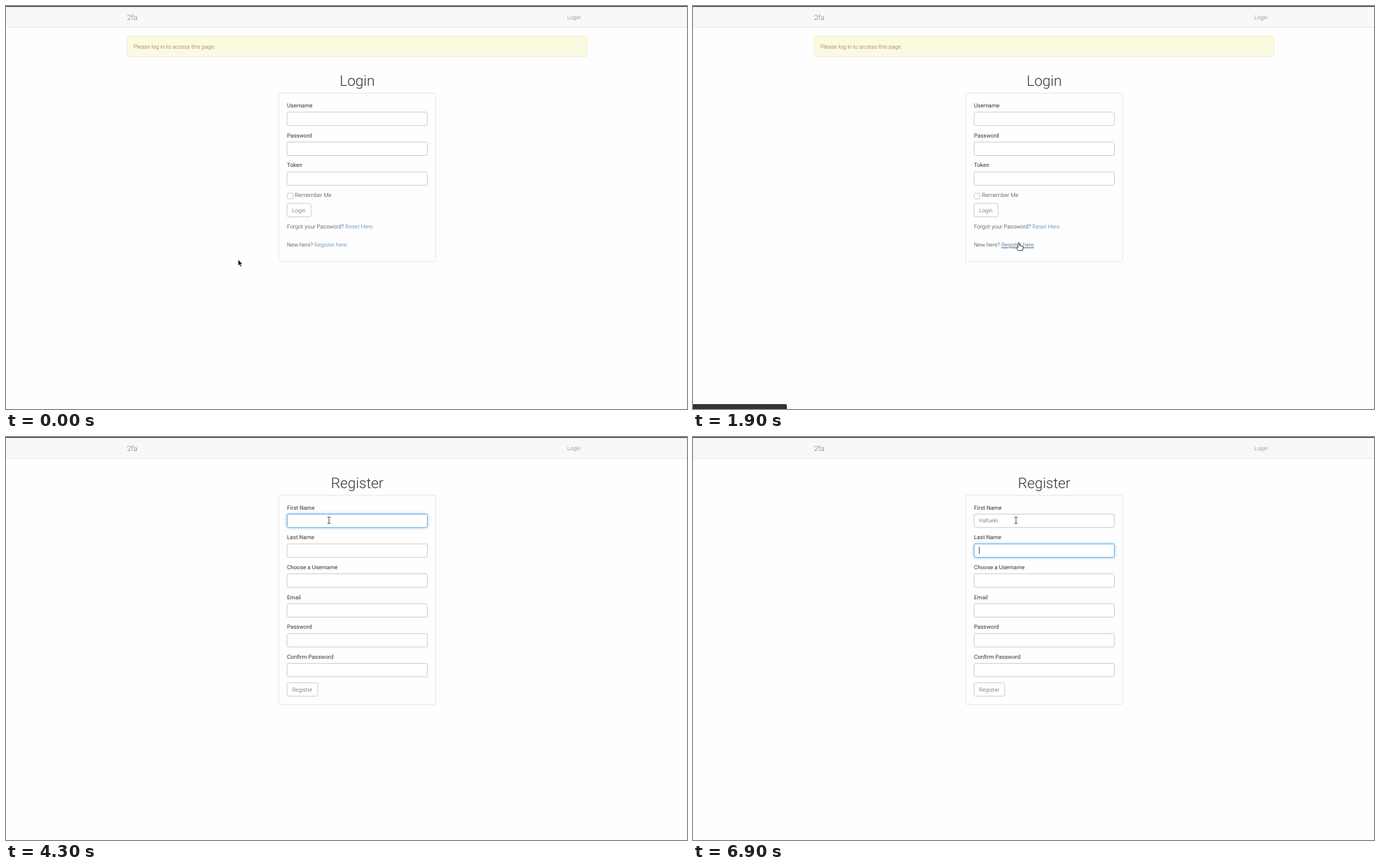
Recreate the animation shown at these times as an HTML page. Size 972 by 576 pixels, loop 8 s.

```html
<!DOCTYPE html>
<html lang="en">
<head>
<meta charset="utf-8">
<title>Sign-up form</title>
<style>
html, body { margin: 0; width: 100%; height: 100%; overflow: hidden; background: #fefefe; }
svg { display: block; }
text { font: 300 8.07px Roboto, sans-serif; fill: #333; text-rendering: geometricPrecision; white-space: pre; }
.label { font-weight: 400; }
.title { font-size: 20.76px; text-anchor: middle; }
.brand { font-size: 10.38px; }
.nav { fill: #777; }
.note { fill: #8a6d3b; }
.value { fill: #555; }
.link { fill: #337ab7; }
.hover { fill: #23527c; text-decoration: underline; }
.panel { fill: #fefefe; stroke: #e6e6e6; }
.field { fill: #fff; stroke: #c8c8c8; stroke-width: .9; }
.glow { fill: #fff; stroke: #66afe9; filter: drop-shadow(0 0 2px rgba(102, 175, 233, .6)); }
</style>
</head>
<body>
<svg id="stage" width="972" height="576" viewBox="0 0 972 576">
  <rect width="972" height="30" fill="#f8f8f8"/>
  <rect y="30" width="972" height="1" fill="#e9e9e9"/>
  <rect width="972" height="1.2" fill="#333"/>
  <text class="nav brand" x="172.8" y="19.7">2fa</text>
  <text class="nav" x="801" y="19">Login</text>
  <g id="login"></g>
  <g id="register"></g>
  <path id="status" d="M0 576V569H132Q134 569 134 571V576Z" fill="#333"/>
  <path id="arrow" d="M.3 .3V9.2L2.3 7.4L3.9 10.9L5.4 10.2L3.9 6.9L6.5 6.7Z" fill="#111" stroke="#fff" stroke-width=".6"/>
  <path id="hand" d="M-1.1 1Q0 -.3 1.1 1V4.3L5 5.1Q6.6 5.6 6.3 7.6L5.3 11.4H-.6L-3.4 7.8Q-3.2 6 -1.1 7.3Z" fill="#fff" stroke="#222" stroke-width=".9"/>
  <path id="beam" d="M-2.2 -4.5H-.6L0 -4L.6 -4.5H2.2M-2.2 4.5H-.6L0 4L.6 4.5H2.2M0 -4V4" fill="none" stroke="#333" stroke-width=".9"/>
</svg>
<script>
const LOOP = 8000, ROW = 42.67, FIELD_X = 401.2, TEXT_X = 408.2;
const NAME = 'Hafueki', KEY_TIMES = [4500, 5000, 5200, 5400, 5500, 5800, 6300];
const PATH = [
  [0, 331, 362], [200, 331, 362], [300, 350, 358], [500, 430, 338], [600, 455, 333],
  [700, 465, 331], [900, 465, 331], [1000, 465, 332], [1200, 465, 336], [1500, 465, 339],
  [1600, 465, 339], [1700, 465, 338], [1900, 465, 338], [2000, 465, 340], [2100, 465, 333],
  [2400, 463, 215], [2600, 461, 150], [2700, 461, 136], [2800, 461, 136], [3000, 461, 119]
];
const $ = id => document.getElementById(id);

const box = (cls, x, y, w, h, extra = '') =>
  `<rect class="${cls}" x="${x}" y="${y}" width="${w}" height="${h}" rx="2" ${extra}/>`;
const text = (cls, x, y, str, extra = '') =>
  `<text class="${cls}" x="${x}" y="${y}" ${extra}>${str}</text>`;
const input = (cls, y, extra) => box(cls, FIELD_X, y, 200.2, 19.2, extra);
const button = (y, w, str) =>
  box('field', FIELD_X, y, w, 19.2) + text('value', TEXT_X, y + 12.4, str);

function form(title, top, height, labels) {
  const rows = labels.map((label, i) => {
    const y = top + 27 + i * ROW;
    return text('label', 401, y - 6.6, label) + input('field', y);
  });
  return text('title', 501.3, top - 10.3, title) +
    box('panel', 389.3, top, 224, height) + rows.join('');
}

$('login').innerHTML =
  box('', 173.3, 43, 656, 29.4, 'fill="#fafae1" stroke="#f3eecb"') +
  text('note', 182, 60.7, 'Please log in to access this page.') +
  form('Login', 124.7, 240.5, ['Username', 'Password', 'Token']) +
  box('field', 401.4, 267.4, 8.4, 8.4) +
  text('', 412.4, 272.9, 'Remember Me') +
  button(282.2, 34.2, 'Login') +
  text('', 401, 318.3, 'Forgot your Password? <tspan class="link">Reset Here</tspan>.') +
  text('', 401, 344.3, 'New here? <tspan id="signup">Register here</tspan>.');

$('register').innerHTML =
  form('Register', 83.2, 299.2, ['First Name', 'Last Name', 'Choose a Username', 'Email', 'Password', 'Confirm Password']) +
  button(351.2, 43.7, 'Register') +
  input('glow', 110.2, 'id="focus0"') + input('glow', 110.2 + ROW, 'id="focus1"') +
  text('value', TEXT_X, 122.1, '', 'id="typed"') +
  '<rect id="caret" width=".9" height="10" fill="#444"/>';

const clamp = v => Math.max(0, Math.min(1, v));
const show = (id, on) => $(id).setAttribute('opacity', Number(on));

function pointer(t) {
  const i = PATH.findIndex(p => p[0] > t);
  if (i < 0) return PATH[PATH.length - 1].slice(1);
  const [a, b] = [PATH[i - 1], PATH[i]];
  const k = (t - a[0]) / (b[0] - a[0]);
  return [1, 2].map(n => a[n] + (b[n] - a[n]) * k);
}

function draw(time) {
  const t = Math.floor(time % LOOP / 100) * 100; // the screen refreshes ten times a second
  const registering = t >= 2000;
  const [x, y] = pointer(t);
  const overLink = !registering && t >= 1200;
  const row = (y - 109.7) / ROW;
  const overField = registering && row >= 0 && row % 1 < 19.6 / ROW;

  show('login', !registering);
  show('register', registering);
  show('status', registering ? 0 : clamp((t - 1200) / 300));
  $('signup').setAttribute('class', overLink ? 'link hover' : 'link');

  const shape = overLink ? 'hand' : overField ? 'beam' : 'arrow';
  for (const id of ['arrow', 'hand', 'beam']) show(id, id === shape);
  $(shape).setAttribute('transform', `translate(${x} ${y})`);

  const leave = clamp((t - 6700) / 200);
  show('focus0', clamp((t - 3100) / 200) * (1 - leave));
  show('focus1', leave);

  const typed = $('typed'), second = t >= 6800;
  typed.textContent = NAME.slice(0, KEY_TIMES.filter(k => k <= t).length);
  const offset = second ? 0 : typed.getComputedTextLength();
  $('caret').setAttribute('x', TEXT_X + offset);
  $('caret').setAttribute('y', second ? 114.2 + ROW : 114.2);
  show('caret', t >= 3100 && (t < 4300 || t >= 4500));
}

const start = performance.now();
function tick() {
  draw(performance.now() - start);
  requestAnimationFrame(tick);
}
tick();
</script>
</body>
</html>
```
